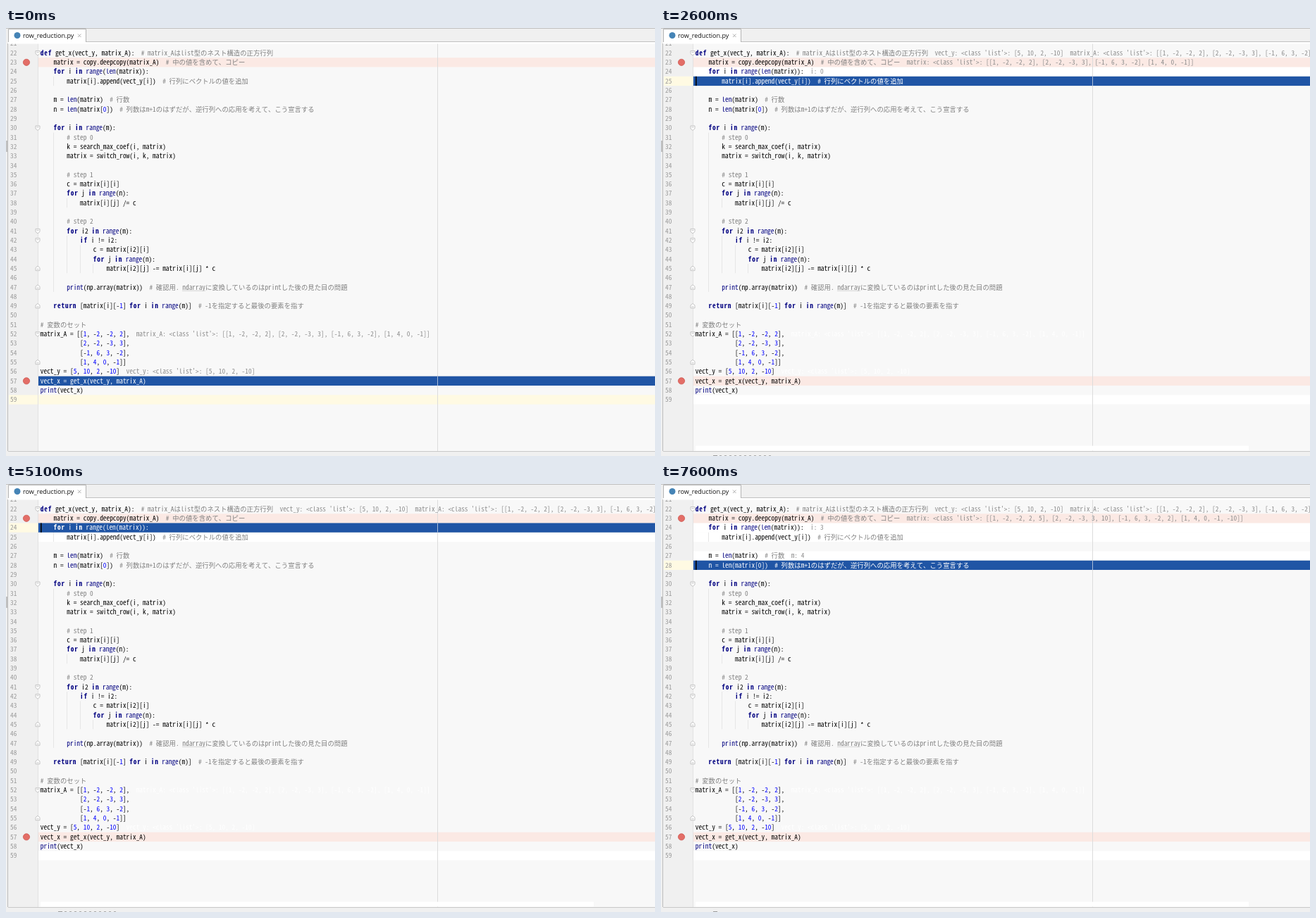
An HTML page that plays this animation: 921 by 608 pixels, repeating every 8 s.

```html
<!DOCTYPE html>
<html lang="ja">
<head>
<meta charset="utf-8">
<style>
html, body { margin: 0; width: 100%; height: 100%; overflow: hidden; background: #f8f8f8; }
svg { display: block; }
text { white-space: pre; font: 9.37px "Noto Sans Mono CJK JP", "Noto Sans CJK JP", "Noto Sans CJK", "DejaVu Sans Mono", monospace; }
text.bold { font-weight: bold; }
text.tab { font: 9px "Open Sans", "Noto Sans", sans-serif; }
</style>
</head>
<body>
<svg id="stage" width="921" height="608" viewBox="0 0 921 608"></svg>
<script>
const LOOP = 8000, FIRST = 22, LAST = 59;
const LEFT = 48.8, CELL = 4.685, BOLD_CELL = 5.465, ROW = 13.31;

const code = `def get_x(vect_y, matrix_A):  # matrix_Aはlist型のネスト構造の正方行列
    matrix = copy.deepcopy(matrix_A)  # 中の値を含めて、コピー
    for i in range(len(matrix)):
        matrix[i].append(vect_y[i])  # 行列にベクトルの値を追加

    m = len(matrix)  # 行数
    n = len(matrix[0])  # 列数はm+1のはずだが、逆行列への応用を考えて、こう宣言する

    for i in range(m):
        # step 0
        k = search_max_coef(i, matrix)
        matrix = switch_row(i, k, matrix)

        # step 1
        c = matrix[i][i]
        for j in range(n):
            matrix[i][j] /= c

        # step 2
        for i2 in range(m):
            if i != i2:
                c = matrix[i2][i]
                for j in range(n):
                    matrix[i2][j] -= matrix[i][j] * c

        print(np.array(matrix))  # 確認用. ndarrayに変換しているのはprintした後の見た目の問題

    return [matrix[i][-1] for i in range(m)]  # -1を指定すると最後の要素を指す

# 変数のセット
matrix_A = [[1, -2, -2, 2],
            [2, -2, -3, 3],
            [-1, 6, 3, -2],
            [1, 4, 0, -1]]
vect_y = [5, 10, 2, -10]
vect_x = get_x(vect_y, matrix_A)
print(vect_x)
`.split("\n");

const matrixA = [[1, -2, -2, 2], [2, -2, -3, 3], [-1, 6, 3, -2], [1, 4, 0, -1]];
const vectY = [5, 10, 2, -10];

// Debugger states: start time, executing line, appended rows, loop index, value just changed
const steps = [
  [0, 57], [100, 57], [1100, 23], [1600, 23],
  [2100, 24, 0, null, true], [2600, 25, 0, 0],
  [3100, 24, 1, 0, true], [3600, 25, 1, 1],
  [4100, 24, 2, 1, true], [4600, 25, 2, 2],
  [5100, 24], [5600, 24, 3, 2, true],
  [6100, 25, 3, 3], [6600, 24, 4, 3, true],
  [7100, 27, 4, 3], [7600, 28, 4, 3]
].map(([time, line, rows = null, i = null, hot = false]) => ({ time, line, rows, i, hot }));

const GRAY = "#8c8c8c", ORANGE = "#ca7e03", GREEN = "#3fc488";
const midY = line => 35.5 + (line - FIRST) * ROW;
const rect = (x, y, w, h, fill) => `<rect x="${x}" y="${y}" width="${w}" height="${h}" fill="${fill}"/>`;
const path = (d, stroke, fill = "none") => `<path d="${d}" stroke="${stroke}" fill="${fill}"/>`;
const band = (line, fill, x = 45) => rect(x, midY(line) - ROW / 2, 921 - x, ROW, fill);
const list = values => `[${values.join(", ")}]`;
const listText = values => `<class 'list'>: ${list(values)}`;
const matrixText = rows => listText(matrixA.map((r, n) => list(n < rows ? [...r, vectY[n]] : r)));

const advance = (ch, bold) => ch > "\u2fff" ? 2 * CELL : bold ? BOLD_CELL : CELL;

// Places characters on the editor grid; returns markup and the end position
function write(x, line, str, fill, bold = false) {
  const xs = [];
  for (const ch of str) {
    xs.push(x.toFixed(2));
    x += advance(ch, bold);
  }
  const safe = str.replace(/&/g, "&amp;").replace(/</g, "&lt;");
  const y = (midY(line) + 3.3).toFixed(2);
  return { x, svg: `<text x="${xs.join(" ")}" y="${y}" fill="${fill}"${bold ? ' class="bold"' : ""}>${safe}</text>` };
}

function tokenColor(token) {
  if (token[0] === "#") return "#808080";
  if (/^(def|for|in|if|return|len|range|print)$/.test(token)) return "#000080";
  return /^\d+$/.test(token) ? "#0000ff" : "#000";
}

function codeLine(line, executing) {
  let x = LEFT, svg = "";
  for (const token of code[line - FIRST].match(/#.*|\w+|\s+|[^\w\s#]+/g) || []) {
    if (!token.trim()) {
      x += token.length * CELL;
      continue;
    }
    const bold = /^(def|for|in|if|return)$/.test(token);
    const out = write(x, line, token, executing ? "#fff" : tokenColor(token), bold);
    svg += out.svg;
    x = out.x;
  }
  return { x, svg };
}

function hintsFor(line, s) {
  const early = s.time < 1100;
  const vector = ["vect_y", listText(vectY)];
  const original = ["matrix_A", matrixText(0)];
  const ghost = early ? GRAY : "#fff";
  if (line === 22 && s.time >= 1600) return [[...vector, GRAY, GRAY], [...original, GRAY, GRAY]];
  if (line === 23 && s.rows !== null) return [["matrix", matrixText(s.rows), GRAY, s.hot ? ORANGE : GRAY]];
  if (line === 24 && s.i !== null) {
    if (s.line === 24) return [["i", s.i, GREEN, GREEN]];
    return [["i", s.i, GRAY, s.line === 25 && s.i > 0 ? ORANGE : GRAY]];
  }
  if (line === 27 && s.line === 28) return [["m", 4, GRAY, GRAY]];
  if (line === 52) return [[...original, ghost, ghost]];
  if (line === 56) return [[...vector, ghost, ghost]];
  return [];
}

function guides() {
  const spans = [[4, 25, 25], [4, 31, 47], [8, 38, 38], [8, 42, 45], [12, 43, 45], [16, 45, 45]];
  return spans.map(([col, a, b]) => {
    const x = Math.floor(LEFT + col * CELL) + 0.5;
    return path(`M${x} ${midY(a) - ROW / 2}V${midY(b) + ROW / 2}`, "#e6e6e6");
  }).join("");
}

function foldMark(line, dir) {
  const y = midY(line), a = y - 3 * dir, b = y + 1 * dir, tip = y + 3.5 * dir;
  return path(`M42 ${a}H48V${b}L45 ${tip}L42 ${b}ZM43.5 ${y - dir}H46.5`, "#c4c4c4", "#fff");
}

function breakpoint(line) {
  return `<circle cx="29" cy="${midY(line)}" r="4.6" fill="#e36e67" stroke="#cf5952" stroke-width=".8"/>`;
}

function header() {
  return rect(0, 0, 921, 22, "#f0f0f0") + rect(3, 20, 918, 2.5, "#fff")
    + path("M0 .5H921M113 19.5H921", "#c0c0c0")
    + path("M3.5 20V1.5H113.5V20", "#b4b4b4", "#fff")
    + '<circle cx="16" cy="10.5" r="4.5" fill="#4584b6"/>'
    + '<text class="tab" x="24" y="14" fill="#111">row_reduction.py</text>'
    + path("M102 8.5L106.5 13M106.5 8.5L102 13", "#b0b0b0");
}

function footer(s) {
  let svg = rect(0, 601, 921, 7, "#f0f0f0") + path("M3 601.5H921", "#c8c8c8");
  if (s.time >= 1600) {
    const shade = s.time < 2100 ? "#d4d4d4" : s.time < 2600 ? "#e2e2e2" : "#fff";
    svg += rect(49, 593.5, 785, 7, shade) + rect(74, 607, 6, 1, "#999");
    if (s.line === 25 || s.time === 5100) svg += '<path d="M83 607.5H156" stroke="#aaa" stroke-dasharray="3 4"/>';
  }
  return svg;
}

function render(s) {
  const started = s.time >= 1100;
  const caretLine = started ? s.line : LAST;
  const visited = new Set(steps.filter(p => p.time >= 1100 && p.time < s.time).map(p => p.line));
  let svg = rect(0, 0, 921, 608, "#f8f8f8") + rect(0, 0, 45, 608, "#f0f0f0");
  for (const line of visited) svg += band(line, "#fff");
  if (started) svg += band(LAST, "#fff");
  svg += band(23, "#fbe9e4") + band(57, "#fbe9e4");
  svg += band(caretLine, "#fffae3", 4) + guides();
  svg += path("M612.5 22V601", "#dcdcdc");
  svg += band(s.line, "#2055a5") + path(`M612.5 ${midY(s.line) - ROW / 2}v${ROW}`, "#a9bbd6");
  svg += path("M45.5 22V601", "#e2e2e2") + path("M2.5 0V608", "#bcbcbc") + rect(0, 160, 2, 16, "#c0c0c0");

  for (let line = FIRST - 1; line <= LAST; line++) {
    svg += write(6, line, String(line), "#999").svg;
    if (line < FIRST) continue;
    const text = codeLine(line, line === s.line);
    let x = text.x;
    svg += text.svg;
    for (const [name, value, nameFill, valueFill] of hintsFor(line, s)) {
      const label = write(x + 2 * CELL, line, name + ":", nameFill);
      const body = write(label.x + CELL, line, String(value), valueFill);
      svg += label.svg + body.svg;
      x = body.x;
    }
  }
  svg += path(`M250 ${midY(47) + 5}h33`, "#d4d4d4");
  for (const line of [22, 30, 41, 42, 52]) svg += foldMark(line, 1);
  for (const line of [45, 47, 49, 55]) svg += foldMark(line, -1);
  svg += breakpoint(23) + breakpoint(57);
  if (s.time >= 100) svg += rect(49, midY(caretLine) - ROW / 2, 1.6, ROW, "#000");
  return svg + footer(s) + header();
}

const stage = document.getElementById("stage");
const start = performance.now();
let shown = null;

function tick() {
  const time = (performance.now() - start) % LOOP;
  const step = steps.findLast(s => s.time <= time);
  if (step !== shown) {
    stage.innerHTML = render(step);
    shown = step;
  }
  requestAnimationFrame(tick);
}
tick();
</script>
</body>
</html>
```
